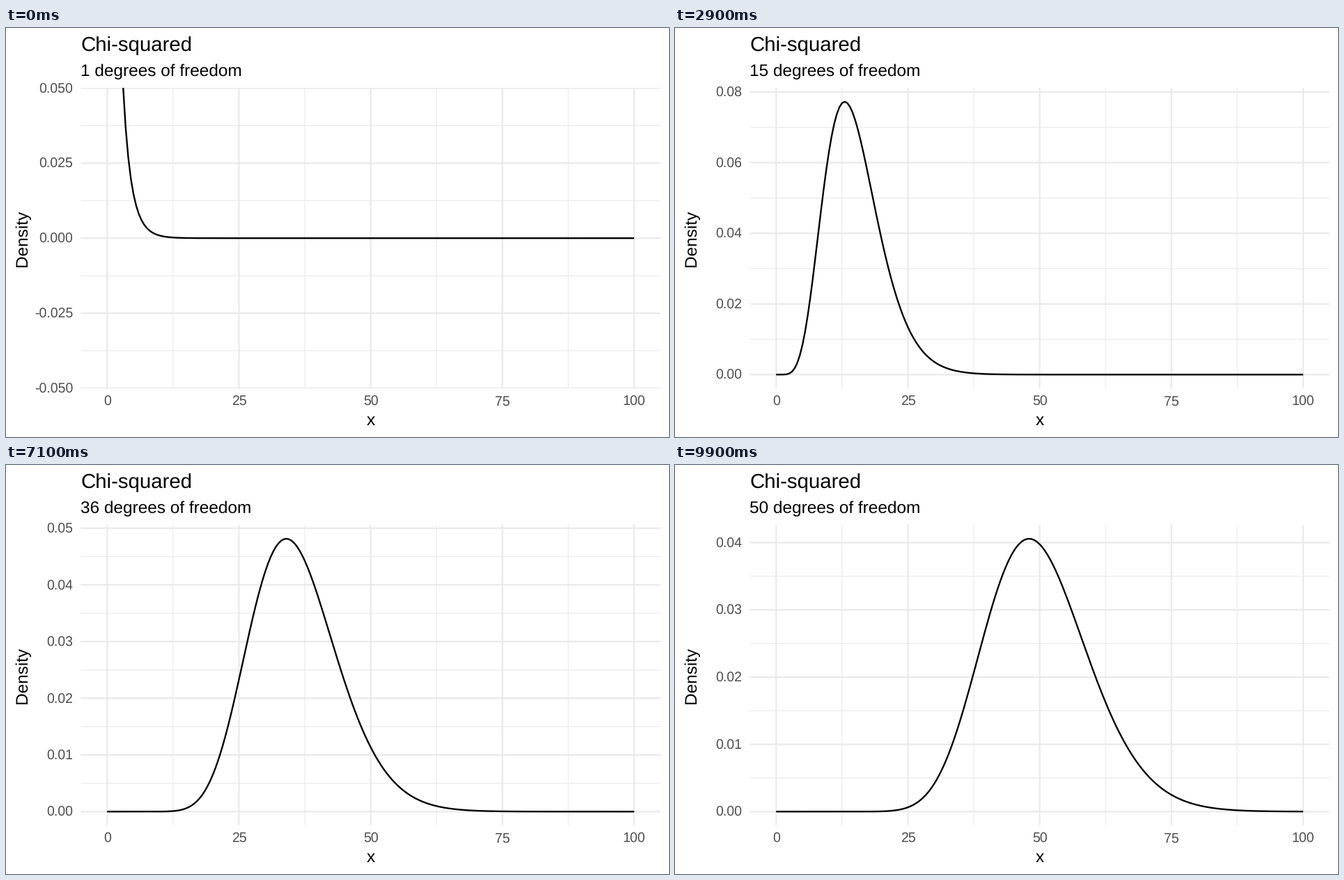
Animation of 952x588 px, one loop 10 s. Source, as a matplotlib script:

```python
import math

import matplotlib.pyplot as plt
import numpy as np
from matplotlib.animation import FuncAnimation
from matplotlib.collections import LineCollection

W, H, DPI = 952, 588, 100
FRAMES, INTERVAL = 100, 100
LEFT, RIGHT, TOP, BOTTOM = 107.4, 939.8, 86.4, 517.9
GRID, TICK = "#EBEBEB", "#4D4D4D"
BASE = 24.44
SMALL, LARGE = BASE * 0.8, BASE * 1.2
NICE = [1, 5, 2, 2.5, 4, 3]

plt.rcParams["font.family"] = "Liberation Sans"
plt.rcParams["text.hinting"] = "none"


def px(size):
    """Pixels to points."""
    return size * 72 / DPI


def chi_squared(x, k):
    norm = 2 ** (k / 2) * math.gamma(k / 2)
    with np.errstate(divide="ignore"):
        return x ** (k / 2 - 1) * np.exp(-x / 2) / norm


def pretty_step(lo, hi, want=5):
    """Choose ticks by simplicity, coverage and density; return the step."""
    span = hi - lo
    best, best_step = -math.inf, None
    power = math.floor(math.log10(span))
    for i, q in enumerate(NICE):
        for z in range(power - 2, power + 1):
            step = q * 10.0 ** z
            for count in range(2, 11):
                for first in range(-count, 2):
                    a = first * step
                    b = a + (count - 1) * step
                    has_zero = first <= 0 <= first + count - 1
                    simple = has_zero - i / (len(NICE) - 1)
                    cover = 1 - 0.5 * ((hi - b) ** 2 + (lo - a) ** 2) / (0.1 * span) ** 2
                    ratio = (want - 1) / (max(b, hi) - min(a, lo)) * step
                    dense = 2 - max(ratio, 1 / ratio)
                    score = 0.25 * simple + 0.2 * cover + 0.5 * dense
                    if score > best + 1e-12:
                        best, best_step = score, step
    return best_step


def multiples(step, lo, hi):
    eps = 1e-9
    return range(math.ceil(lo / step - eps), math.floor(hi / step + eps) + 1)


def decimals(step):
    d = 0
    while abs(round(step, d) - step) > 1e-9:
        d += 1
    return d


fig = plt.figure(figsize=(W / DPI, H / DPI), dpi=DPI, facecolor="white")

stage = fig.add_axes([0, 0, 1, 1])
stage.set(xlim=(0, W), ylim=(H, 0))
stage.axis("off")

panel = fig.add_axes([LEFT / W, 1 - BOTTOM / H, (RIGHT - LEFT) / W, (BOTTOM - TOP) / H])
panel.set(xlim=(-5, 105), ylim=(-0.05, 0.05))
panel.axis("off")


def label(x, y, text, size, color="black", **kw):
    return stage.text(x, y, text, fontsize=px(size), color=color, va="baseline", **kw)


def grid_lines(width, zorder):
    lines = LineCollection([], colors=GRID, linewidths=px(width), zorder=zorder, snap=False)
    panel.add_collection(lines, autolim=False)
    return lines


MID = (TOP + BOTTOM) / 2
label(LEFT, 33.2, "Chi-squared", LARGE)
subtitle = label(LEFT, 69.2, "", BASE)
label((LEFT + RIGHT) / 2, 570.6, "x", BASE, ha="center")
label(29.7, MID, "Density", BASE, ha="center", rotation=90, rotation_mode="anchor")

for i in range(9):
    v = i * 12.5
    major = i % 2 == 0
    panel.axvline(v, color=GRID, lw=px(2.37 if major else 1.185), zorder=1, snap=False)
    if major:
        label(LEFT + (v + 5) / 110 * (RIGHT - LEFT), 542.9, f"{v:.0f}", SMALL, TICK, ha="center")

minor_y = grid_lines(1.185, 1)
major_y = grid_lines(2.37, 2)
y_labels = [label(LEFT - 10.96, 0, "", SMALL, TICK, ha="right") for _ in range(10)]

xs = np.linspace(0, 100, 201)
curve, = panel.plot([], [], color="black", lw=px(2.37), zorder=3, snap=False,
                    solid_capstyle="butt", solid_joinstyle="round")
panel.set(xlim=(-5, 105))


def draw(n):
    # The curve steps one frame ahead of the subtitle.
    k = n // 2 + 1
    subtitle.set_text(f"{max(1, (n + 1) // 2)} degrees of freedom")

    ys = chi_squared(xs, k)
    ok = np.isfinite(ys)
    curve.set_data(xs[ok], ys[ok])

    if ok.all():
        peak = ys.max()
        lo, hi = -0.05 * peak, 1.05 * peak
    else:
        lo, hi = -0.05, 0.05
    panel.set_ylim(lo, hi)

    step = pretty_step(lo, hi)
    halves = multiples(step / 2, lo, hi)
    rows = [[(-5, i * step / 2), (105, i * step / 2)] for i in halves]
    major_y.set_segments([r for i, r in zip(halves, rows) if i % 2 == 0])
    minor_y.set_segments([r for i, r in zip(halves, rows) if i % 2])

    for t in y_labels:
        t.set_text("")
    d = decimals(step)
    for t, i in zip(y_labels, multiples(step, lo, hi)):
        v = i * step
        t.set_text(f"{v:.{d}f}")
        t.set_y(BOTTOM - (v - lo) / (hi - lo) * (BOTTOM - TOP) + 7)
    return []


anim = FuncAnimation(fig, draw, frames=FRAMES, interval=INTERVAL,
                     init_func=lambda: draw(0), repeat=True, repeat_delay=0, blit=False)
plt.show()
```
